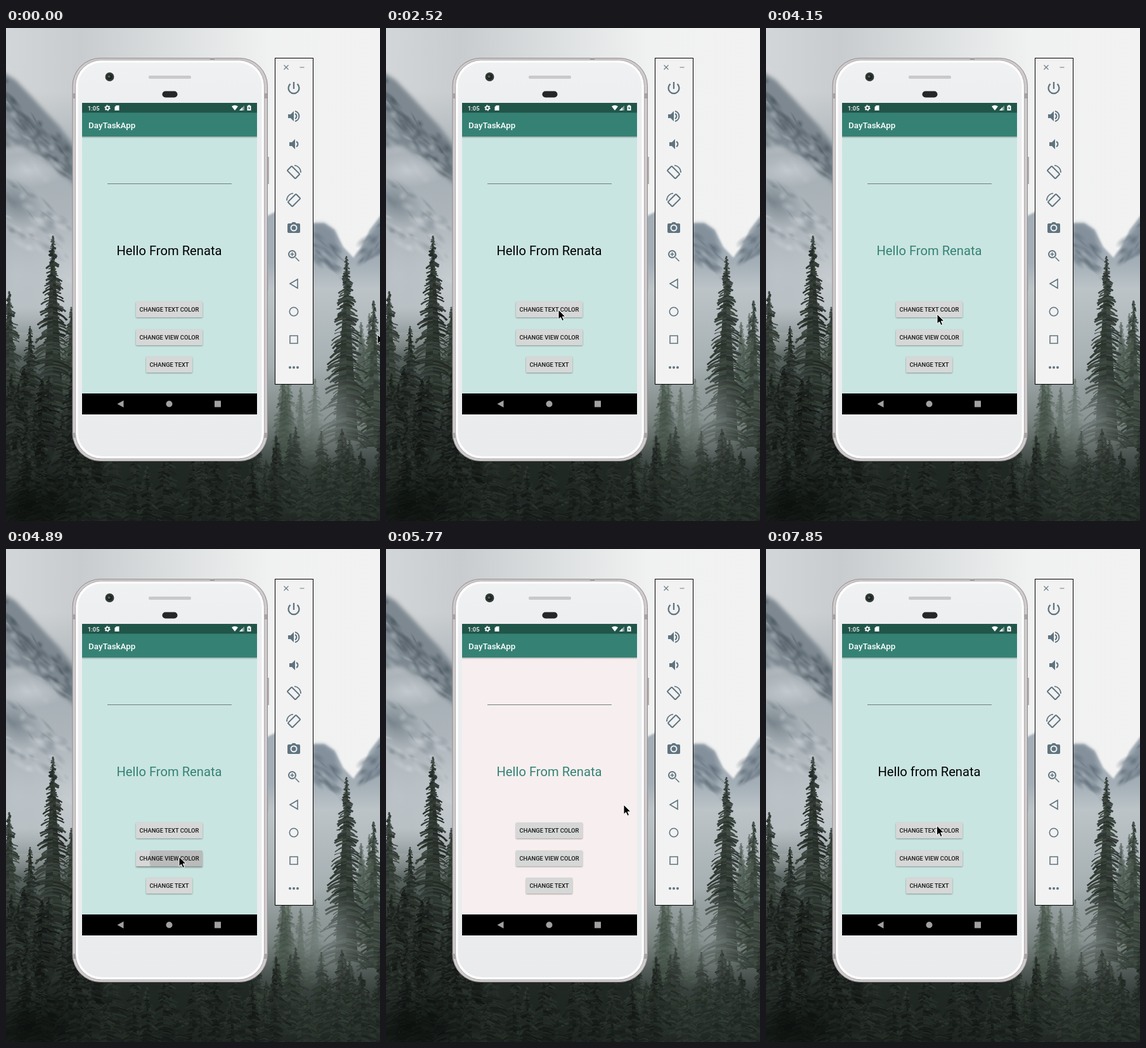
Animation of 590x777 px, one loop 8000 ms. Source, as an HTML page with a canvas:

```html
<!DOCTYPE html>
<html lang="en">
<head>
<meta charset="utf-8">
<title>Phone emulator demo</title>
<style>
  html, body { margin: 0; width: 100%; height: 100%; overflow: hidden; }
  canvas, svg { position: absolute; left: 0; top: 0; }
  text { font-family: Roboto, sans-serif; }
  .label { font-size: 9.4px; font-weight: 500; text-anchor: middle; fill: #171717; }
  .icon { fill: none; stroke: #5f7480; stroke-width: 2; }
  .solid { fill: #5f7480; stroke: none; }
</style>
</head>
<body>
<canvas id="scenery" width="590" height="777"></canvas>
<svg width="590" height="777" viewBox="0 0 590 777">
  <defs>
    <linearGradient id="face" x2="0" y2="1">
      <stop stop-color="#f0f1f2"/><stop offset=".15" stop-color="#ebedee"/><stop offset="1" stop-color="#e9ebed"/>
    </linearGradient>
    <linearGradient id="drop" x2="0" y2="1">
      <stop stop-opacity=".28"/><stop offset="1" stop-opacity="0"/>
    </linearGradient>
    <filter id="soft" x="-10%" y="-30%" width="120%" height="170%"><feGaussianBlur stdDeviation="1"/></filter>
  </defs>

  <!-- Phone body -->
  <g>
    <path d="M413 203h2v43h-2zM412 384h2v30h-2z" fill="#b5b0b1"/>
    <rect x="105" y="47.5" width="307.5" height="635" rx="44" fill="#cfcbcc" stroke="#8f8a8b"/>
    <path d="M105 103h5v8h-5zM407 103h5v8h-5zM105 638h5v8h-5zM407 638h5v8h-5zM322 47h7v3h-7z" fill="#a7a2a3"/>
    <rect x="109.5" y="50.5" width="298" height="628.5" rx="41" fill="#f4f3f4" stroke="#aea9ab"/>
    <rect x="112" y="53" width="293" height="623.5" rx="39" fill="url(#face)" stroke="#fff" stroke-width="3"/>
    <circle cx="163.5" cy="77" r="7" fill="#353837"/>
    <circle cx="163.5" cy="77" r="4" fill="#19231f"/>
    <circle cx="162.5" cy="76.5" r="2" fill="#49664f"/>
    <rect x="225" y="75" width="67" height="5" rx="2" fill="#c9c9cb"/>
    <rect x="246.5" y="99.5" width="24" height="10" rx="5" fill="#252628"/>
  </g>

  <!-- Screen -->
  <rect id="view" x="120" y="118" width="276" height="491"/>
  <path d="M120 118h276v16H120z" fill="#215549"/>
  <path d="M120 133.500h276V171H120z" fill="#358275"/>
  <path d="M120 171h276v3H120z" fill="url(#drop)"/>
  <g fill="#fff">
    <text x="129" y="129.500" font-size="9.4" font-weight="500">1:05</text>
    <circle cx="160" cy="126" r="2.6" fill="none" stroke="#fff" stroke-width="1.8"/>
    <circle cx="160" cy="126" r="4" fill="none" stroke="#fff" stroke-width="1.3" stroke-dasharray="2 2.190"/>
    <path d="M174 122h4.500v8h-7v-5.500z"/>
    <path d="M356 123.500q5-3.500 10 0l-5 6.500z"/>
    <path d="M376 122v8h-8z" opacity=".45"/><path d="M373 125v5h-5z"/>
    <path d="M382 121.500h3v1h1.500v7.500h-6v-7.500h1.500z"/>
    <path d="M384 123.500l-2 3h1v2.500l2-3h-1z" fill="#215549"/>
    <text x="130" y="158" font-size="13.4" font-weight="500">DayTaskApp</text>
  </g>
  <path d="M160 245.500H356" stroke="#6f7f7d"/>
  <text id="greeting" x="257.5" y="358" font-size="20.2" text-anchor="middle"></text>
  <g id="buttons"></g>
  <path d="M120 576h276v33H120z"/>
  <path d="M175.500 592.500L185.500 587v11zM329 587.500h10v10h-10z" fill="#a0a0a0"/>
  <circle cx="257.5" cy="592.5" r="5" fill="#a0a0a0"/>

  <!-- Emulator toolbar -->
  <rect x="424.500" y="47.500" width="60" height="514" fill="#f2f2f2" stroke="#000"/>
  <path d="M438.500 58.500l7 7m0-7l-7 7M463.500 62h7" stroke="#6a7c87" stroke-width="1.2"/>
  <g id="icons" class="icon"></g>

  <path id="cursor" d="M0 0V15.200L3.500 12 6 17.500 8.600 16.300 6.200 11H11z" stroke="#fff" stroke-width="1"/>
</svg>
<script>
const $ = id => document.getElementById(id);

// ---- Misty mountain backdrop, painted once ----
const ctx = $('scenery').getContext('2d');
let seed = 11;
const random = () => (seed = (seed * 16807) % 2147483647) / 2147483647;
const between = (a, b) => a + (b - a) * random();

function gradient(x2, y1, y2, stops) {
  const g = ctx.createLinearGradient(0, y1, x2, y2);
  stops.forEach(([at, color]) => g.addColorStop(at, color));
  return g;
}
function shape(path, color, blur) {
  ctx.filter = `blur(${blur}px)`;
  ctx.fillStyle = color;
  ctx.fill(new Path2D(path));
  ctx.filter = 'none';
}
function mist(x, y, rx, ry, rgb, alpha, angle = 0) {
  ctx.save();
  ctx.translate(x, y);
  ctx.rotate(angle);
  ctx.scale(rx, ry);
  const g = ctx.createRadialGradient(0, 0, 0, 0, 0, 1);
  g.addColorStop(0, `rgba(${rgb},${alpha})`);
  g.addColorStop(1, `rgba(${rgb},0)`);
  ctx.fillStyle = g;
  ctx.fillRect(-1, -1, 2, 2);
  ctx.restore();
}
// Streaks of rock and cloud scattered over a band that falls by `slope` per pixel.
function streaks(count, x1, x2, y, depth, slope, rgb, alpha) {
  for (let i = 0; i < count; i++) {
    const x = between(x1, x2);
    mist(x, y + slope * (x - x1) + between(0, depth), between(6, 22), between(2, 8), rgb, alpha, Math.atan(slope) + between(-.3, .3));
  }
}
function tree(x, top, height, width, light) {
  ctx.fillStyle = `hsl(135 10% ${light - 3}%)`;
  ctx.beginPath();
  ctx.moveTo(x, top);
  ctx.lineTo(x + width * .4, top + height);
  ctx.lineTo(x - width * .4, top + height);
  ctx.fill();
  for (let y = 0; y < height; y += 2.5) {
    for (const side of [-1, 1]) {
      const reach = (1.5 + width * (y / height) ** .85) * between(.25, 1.05);
      ctx.strokeStyle = `hsl(${between(120, 160)} ${between(5, 11)}% ${light + between(-6, 6)}%)`;
      ctx.lineWidth = between(1.2, 3.4);
      ctx.beginPath();
      ctx.moveTo(x, top + y);
      ctx.quadraticCurveTo(x + side * reach * .6, top + y + 1, x + side * reach, top + y + reach * between(.2, .6));
      ctx.stroke();
    }
  }
}
function forest(count, x1, x2, y1, y2, light) {
  for (let i = 0; i < count; i++) {
    tree(between(x1, x2), y1 + (y2 - y1) * i / count, between(100, 170), between(20, 40), light + between(-3, 3));
  }
}
function paintScenery() {
  ctx.fillStyle = gradient(590, 0, 0, [[0, '#d3d6d8'], [.2, '#c8ccce'], [.45, '#dcdfe0'], [.7, '#f0f1f1'], [1, '#f2f2f2']]);
  ctx.fillRect(0, 0, 590, 777);
  ctx.fillStyle = gradient(0, 100, 480, [[0, '#aab2b700'], [.3, '#a6afb5'], [1, '#bcc3c7']]);
  ctx.fillRect(0, 100, 120, 380);
  shape('M-20 60L15 82 40 108 62 132 84 155 118 200V255L70 215 25 185-20 190z', '#7d8890', 3);
  streaks(45, 0, 105, 82, 55, 1.05, '72,84,92', .5);
  streaks(16, 0, 90, 115, 80, .9, '185,193,199', .45);
  mist(35, 225, 60, 26, '205,211,215', .7);
  mist(15, 275, 50, 35, '105,118,127', .7, .6);
  streaks(25, 0, 105, 225, 90, .8, '100,113,122', .35);
  streaks(18, 0, 105, 250, 110, .5, '208,214,218', .4);
  mist(100, 390, 70, 90, '200,206,210', .8);
  mist(20, 390, 50, 60, '190,198,203', .7);

  shape('M405 300L428 288 484 308 502 308 518 318 532 345 548 362 558 350 574 318 600 284V480H405z', '#a3aeb6', 1.5);
  shape('M484 308L502 308 518 320 528 355 520 372 500 352 484 370zM600 292L578 322 566 365 600 350z', '#84919c', 3);
  streaks(22, 484, 530, 312, 50, .8, '92,106,118', .5);
  streaks(14, 560, 590, 335, 45, -.9, '92,106,118', .5);
  ctx.fillStyle = gradient(0, 370, 777, [[0, '#bcc4c800'], [.1, '#bcc4c8'], [.4, '#a6afb1'], [.62, '#78827f'], [.8, '#434c48'], [1, '#2b332f']]);
  ctx.fillRect(400, 370, 190, 407);
  ctx.fillStyle = gradient(0, 440, 640, [[0, '#7e898a00'], [.4, '#56615e'], [1, '#252d29']]);
  ctx.fillRect(0, 440, 400, 337);

  tree(5, 415, 210, 40, 23);
  tree(103, 440, 190, 32, 24);
  tree(74, 328, 270, 42, 20);
  tree(38, 470, 190, 38, 18);
  ctx.globalAlpha = .55;
  forest(5, 560, 590, 450, 520, 34);
  forest(6, 410, 500, 540, 580, 34);
  ctx.globalAlpha = 1;
  tree(580, 430, 230, 32, 27);
  tree(537, 360, 290, 46, 23);
  mist(505, 610, 65, 75, '150,160,160', .65);
  forest(34, 0, 140, 535, 700, 15);
  forest(30, 380, 600, 625, 730, 21);
  mist(500, 650, 80, 45, '125,135,132', .4);
  forest(30, 100, 430, 640, 735, 17);
  ctx.fillStyle = gradient(0, 620, 777, [[0, '#0f161200'], [1, '#0f161266']]);
  ctx.fillRect(0, 620, 590, 157);
  mist(35, 755, 120, 60, '5,9,7', .6);
}
paintScenery();

// ---- Toolbar icons, centred every 44 px ----
const turned = '<rect x="-5" y="-9" width="10" height="18" rx="1" transform="translate(-.5 .5) rotate(-45)"/><path stroke-width="1.600" d="M1-10.500A11 11 0 0 1 11 1"/>';
const icons = [
  '<path stroke-width="2.300" d="M0-10V1M-5.500-6.800A8.500 8.500 0 1 0 5.500-6.800"/>',
  '<path class="solid" d="M-9-3h4l5-5V8l-5-5h-4z"/><path d="M2-4a4.500 4.500 0 0 1 0 8M2-8a8.200 8.200 0 0 1 0 16"/>',
  '<path class="solid" d="M-7-3h4l5-5V8l-5-5h-4z"/><path d="M4-4a4.500 4.500 0 0 1 0 8"/>',
  turned,
  `<g transform="scale(-1 1)">${turned}</g>`,
  '<path class="solid" d="M-8-7h4l2-2h4L4-7h4q2 0 2 2V6q0 2-2 2H-8q-2 0-2-2V-5q0-2 2-2z"/><circle r="4.500" stroke="#f2f2f2"/>',
  '<path d="M2.500 2.500L8.500 8.500M-5.500-2.500h6M-2.500-5.500v6" stroke-width="1.600"/><circle cx="-2.500" cy="-2.500" r="5.500"/>',
  '<path stroke-width="1.600" d="M-6 0L6-7V7z"/>',
  '<circle r="6.700" stroke-width="1.600"/>',
  '<path stroke-width="1.600" d="M-6-6H6V6H-6z"/>',
  '<g class="solid"><circle cx="-6" r="2"/><circle r="2"/><circle cx="6" r="2"/></g>'
];
$('icons').innerHTML = icons.map((icon, i) => `<g transform="translate(454 ${95 + 44 * i})">${icon}</g>`).join('');

// ---- App buttons with press ripples ----
const buttons = [
  { label: 'CHANGE TEXT COLOR', x: 205, y: 431, width: 105, pressAt: 3260, spreadAt: 3410, releaseAt: 3550, tapX: 270 },
  { label: 'CHANGE VIEW COLOR', x: 205, y: 475, width: 105, pressAt: 4890, spreadAt: 5030, releaseAt: 5180, tapX: 273 },
  { label: 'CHANGE TEXT', x: 221, y: 518, width: 73 }
];
$('buttons').innerHTML = buttons.map((b, i) => {
  const box = `x="${b.x}" y="${b.y}" width="${b.width}" height="25" rx="1.500"`;
  return `<clipPath id="clip${i}"><rect ${box}/></clipPath>
    <rect id="shadow${i}" ${box} opacity=".35" filter="url(#soft)"/>
    <rect ${box} fill="#d6d7d7"/>
    <circle id="ripple${i}" cx="${b.tapX || 0}" cy="${b.y + 12}" fill="#000" opacity=".13" clip-path="url(#clip${i})"/>
    <text class="label" x="257.5" y="${b.y + 16}">${b.label}</text>`;
}).join('');

// ---- Timeline ----
const LOOP = 8000;
const cursorStops = [
  [0, 586, 483],
  [300, 570, 477], [450, 522, 461], [590, 461, 444], [740, 397, 436], [880, 338, 434], [1030, 296, 440], [1170, 277.500, 446],
  [2520, 272, 444], [2670, 269.500, 442],
  [4150, 270, 451], [4300, 271, 466], [4440, 272, 480], [4590, 273, 485],
  [5470, 296, 465], [5620, 348, 424], [5770, 375, 403],
  [7260, 364, 406], [7410, 331, 416], [7550, 297, 428], [7700, 276, 435], [7850, 269.500, 436]
];

function draw(t) {
  const [, x, y] = cursorStops.findLast(([start]) => t >= start);
  $('cursor').setAttribute('transform', `translate(${x} ${y})`);

  const reset = t >= 6360;
  $('view').setAttribute('fill', t >= 5030 && !reset ? '#f7efef' : '#c9e5e1');
  $('greeting').setAttribute('fill', t >= 3410 && !reset ? '#358275' : '#000');
  $('greeting').textContent = reset ? 'Hello from Renata' : 'Hello From Renata';

  buttons.forEach((b, i) => {
    const pressed = t >= b.pressAt && t < b.releaseAt;
    $('ripple' + i).setAttribute('r', !pressed ? 0 : t < b.spreadAt ? 47 : 110);
    $('shadow' + i).setAttribute('transform', `translate(0 ${pressed ? 2 : 1})`);
  });
}

function tick() {
  draw(performance.now() % LOOP);
  requestAnimationFrame(tick);
}
tick();
</script>
</body>
</html>
```
